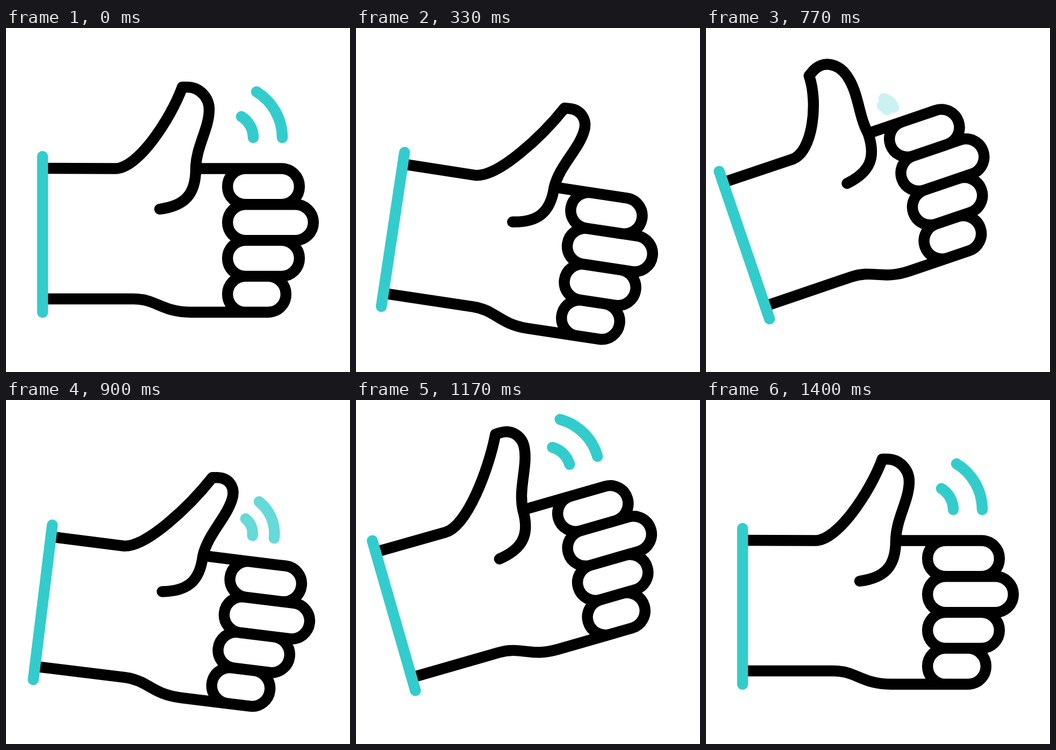
Recreate the animation shown at these times as an HTML page. Size 640x640 px, loop 1670 ms.

```html
<!DOCTYPE html>
<html lang="en">
<head>
<meta charset="utf-8">
<title>Thumb up</title>
<style>
  html, body { margin: 0; height: 100%; overflow: hidden; background: #fff; }
  svg { display: block; width: 100%; height: 100%; }
  path { fill: none; stroke: #000; stroke-width: 20.4; stroke-linejoin: round; }
  .round { stroke-linecap: round; }
  .teal { stroke: #3cc; }
</style>
</head>
<body>
<svg viewBox="0 0 640 640">
  <g id="hand">
    <path id="thumb" class="round"/>
    <path id="fingers"/>
    <path class="round teal" d="M68 239V529"/>
    <path id="rays" class="round teal"/>
  </g>
</svg>
<script>
const LOOP = 1670, FPS = 30;
const KNUCKLE_Y = 261.5, THUMB_HEIGHT = 152;
// Upright thumb, from the wrist side over the tip down to the joint
const THUMB = [[245, 262], [306, 170], [328, 110], [337, 110], [360, 110], [378, 129],
  [378, 152], [378, 187], [353, 222], [353, 262]];

const linear = x => x;
const smooth = x => x * x * (3 - 2 * x);

// cubic-bezier(.5, 0, .5, 1)
function swing(x) {
  let lo = 0, hi = 1;
  for (let i = 0; i < 24; i++) {
    const u = (lo + hi) / 2;
    if (1.5 * u * (1 - u) + u ** 3 < x) lo = u; else hi = u;
  }
  return smooth(lo);
}

// keys: [frame, value] pairs in order of time
function track(frame, ease, ...keys) {
  if (frame <= keys[0][0]) return keys[0][1];
  for (let i = 1; i < keys.length; i++) {
    const [t0, v0] = keys[i - 1], [t1, v1] = keys[i];
    if (frame < t1) return v0 + (v1 - v0) * ease((frame - t0) / (t1 - t0));
  }
  return keys[keys.length - 1][1];
}

// The thumb leans sideways and tilts, both growing with the height above the knuckles
function thumbPath(frame) {
  const forward = track(frame, smooth, [3, 0], [13.5, 1], [21, 0], [28, 1], [42, 0]);
  const back = track(frame, smooth, [13.5, 0], [21, 1], [28, 0]);
  const lean = 30 * forward - 63 * back;
  const tilt = -0.06 * forward - 0.75 * back;
  const drop = 3 * (forward + back);
  const p = THUMB.map(([x, y]) => {
    const h = Math.max(0, KNUCKLE_Y - y) / THUMB_HEIGHT;
    return [x + lean * h ** 1.4, y + (tilt * (x - 347) + drop) * h ** 3];
  });
  return `M70 261L203 ${KNUCKLE_Y}C${p.slice(0, 3)}L${p[3]}C${p.slice(4)}` +
    "C353 310 332 331 286 337";
}

function fingersPath(frame) {
  const r = 33.4;
  return [67, 93, 67, 42].map((length, i) => {
    const close = 3 + 0.9 * i, open = 22.4 + 0.45 * i;
    const left = 445.5 +
      track(frame, swing, [close, 0], [close + 10, -27], [open, -27], [open + 6.5, 0]);
    const top = KNUCKLE_Y + 2 * r * i, bottom = top + 2 * r;
    const palm = i === 0 ? `M355 ${top}H${left}`
      : i === 3 ? `M70 504H237C280 504 290 ${bottom} 344 ${bottom}H${left}` : "";
    return `${palm}M${left} ${top}h${length}a${r} ${r} 0 0 1 0 ${2 * r}` +
      `H${left}a${r} ${r} 0 0 1 0 ${-2 * r}z`;
  }).join("");
}

// Concentric arcs that grow out of a point beside the thumb
function raysPath(scale) {
  const x = 380 + 34 * scale, y = 240 - 36 * scale, angle = 1.023;
  return [46, 100].map(radius => {
    const r = radius * scale;
    return `M${x + r * Math.cos(angle)} ${y - r * Math.sin(angle)}A${r} ${r} 0 0 1 ${x + r} ${y}`;
  }).join("");
}

const [hand, thumb, fingers, rays] =
  ["hand", "thumb", "fingers", "rays"].map(id => document.getElementById(id));

function draw(now) {
  const frame = Math.floor((now % LOOP) * FPS / 1000 + 0.15);
  const angle = track(frame, swing, [4, 0], [14, 12.4], [21, -23.3], [28, 8], [35, -16.05], [42, 0]);
  const glow = track(frame, linear, [2, 1], [10, 0], [21, 0], [29, 1]);
  hand.setAttribute("transform", `rotate(${angle} 130 384)`);
  thumb.setAttribute("d", thumbPath(frame));
  fingers.setAttribute("d", fingersPath(frame));
  rays.setAttribute("d", raysPath(glow));
  rays.setAttribute("opacity", glow);
  requestAnimationFrame(() => draw(performance.now()));
}
draw(performance.now());
</script>
</body>
</html>
```
